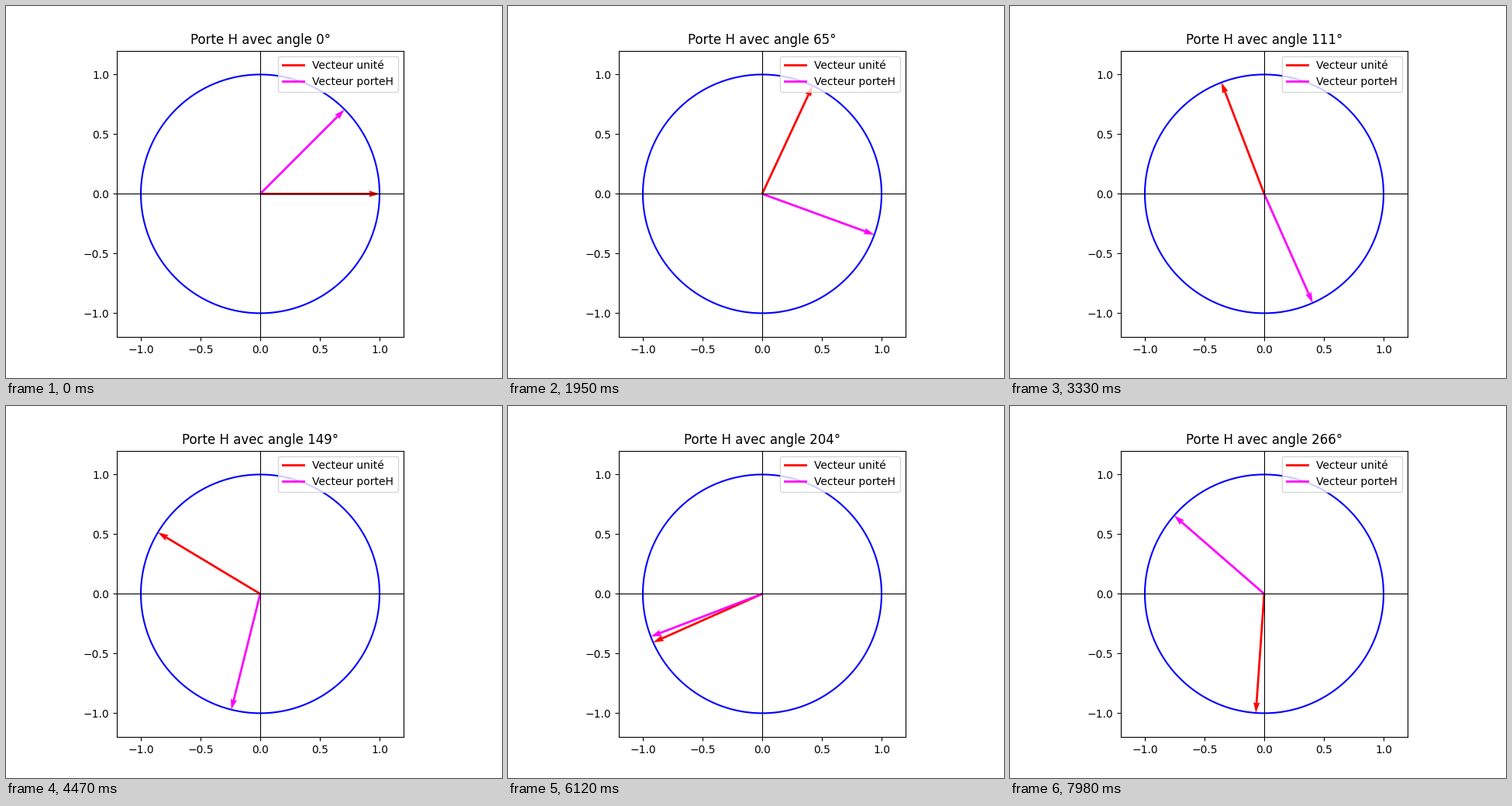
Animation of 640 by 480 pixels, one loop 8000 ms. Source, as a matplotlib script:

```python
import numpy as np
import matplotlib.pyplot as plt
from matplotlib.animation import FuncAnimation
from matplotlib.lines import Line2D

LOOP_MS = 8000
FRAMES = 267  # one degree per frame

fig, ax = plt.subplots(figsize=(6.4, 4.8), dpi=100)
ax.set_xlim(-1.2, 1.2)
ax.set_ylim(-1.2, 1.2)
ax.set_aspect("equal")

t = np.linspace(0, 2 * np.pi, 361)
ax.plot(np.cos(t), np.sin(t), color="blue", lw=1.5)
ax.axhline(0, color="black", lw=0.8)
ax.axvline(0, color="black", lw=0.8)


def direction(deg):
    """Unit vector at an angle in degrees."""
    a = np.radians(deg)
    return np.cos(a), np.sin(a)


def arrow(deg, color):
    return ax.quiver(0, 0, *direction(deg), color=color,
                     angles="xy", scale_units="xy", scale=1)


unit = arrow(0, "red")
gate = arrow(45, "magenta")
title = ax.set_title("")

handles = [
    Line2D([], [], color="red", lw=2, label="Vecteur unité"),
    Line2D([], [], color="magenta", lw=2, label="Vecteur porteH"),
]
ax.legend(handles=handles, loc="upper right")


def update(deg):
    unit.set_UVC(*direction(deg))
    # The gate mirrors the vector about the 22.5° axis
    gate.set_UVC(*direction(45 - deg))
    title.set_text(f"Porte H avec angle {deg}°")
    return unit, gate, title


def reset():
    return update(0)


anim = FuncAnimation(fig, update, frames=FRAMES, init_func=reset,
                     interval=LOOP_MS / FRAMES, repeat=True, repeat_delay=0)
plt.show()
```
